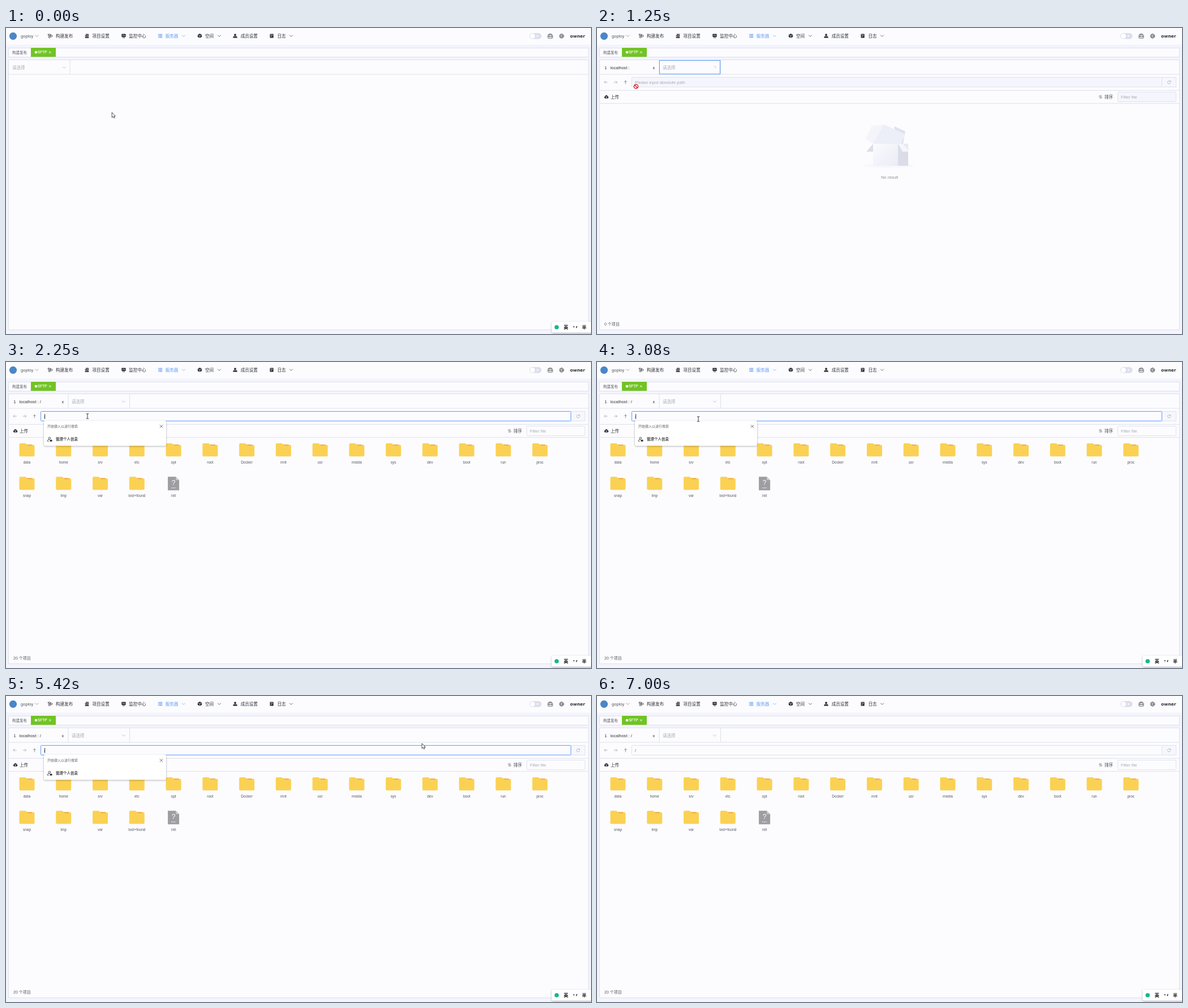
Animation of 1034 by 542 pixels, one loop 7.08 s. Source, as an HTML page:

```html
<!DOCTYPE html>
<html lang="zh-CN">
<head>
<meta charset="utf-8">
<title>SFTP</title>
<style>
html, body { margin: 0; width: 100%; height: 100%; overflow: hidden; background: #f3f4fc; }
svg { display: block; width: 1034px; height: 542px; font-family: "Liberation Sans", "Noto Sans CJK SC", "Noto Sans CJK", sans-serif; }
text { white-space: pre; }
.line { fill: none; stroke-linecap: round; stroke-linejoin: round; }
</style>
</head>
<body>
<svg id="stage" viewBox="0 0 1034 542"></svg>
<script>
const INK = '#303136', GREY = '#a8abb4', EDGE = '#dfe1ec', BLUE = '#5c9cfa', PAPER = '#fcfcff';
const BODY = 7.56, SMALL = 6.48;

const text = (x, y, s, fill = INK, size = BODY, more = '') =>
  `<text x="${x}" y="${y}" font-size="${size}" fill="${fill}" ${more}>${s}</text>`;
const rect = (x, y, w, h, fill, more = '') =>
  `<rect x="${x}" y="${y}" width="${w}" height="${h}" fill="${fill}" ${more}/>`;
const frame = (x, y, w, h, color, fill = 'none', more = '') =>
  rect(x + .5, y + .5, w - 1, h - 1, fill, `stroke="${color}" ${more}`);
const shape = (d, fill, more = '') => `<path d="${d}" fill="${fill}" ${more}/>`;
const line = (d, color = INK, width = .8) =>
  `<path class="line" d="${d}" stroke="${color}" stroke-width="${width}"/>`;
const disc = (x, y, r, fill) => `<circle cx="${x}" cy="${y}" r="${r}" fill="${fill}"/>`;
const at = (x, y, s) => `<g transform="translate(${x} ${y})">${s}</g>`;
const group = (id, s, more = '') => `<g id="${id}" ${more}>${s}</g>`;
const chevron = (x, y, color) => line(`M${x - 2.5} ${y - 1.2}l2.5 2.5l2.5 -2.5`, color, .7);
const cross = (x, y, r, color) => line(`M${x - r} ${y - r}l${2 * r} ${2 * r}m0 ${-2 * r}l${-2 * r} ${2 * r}`, color, .8);

// Icons are centred on their own origin.
const icons = {
  build: `<g class="line" stroke="${INK}" stroke-width=".8"><circle cx="-1.5" cy="-1.7" r="1.6"/><circle cx="-1.5" cy="2" r="1.5"/><circle cx="2" cy="0" r="1.7"/><path d="M-3.5 -3.2v2M0 -2h1"/></g>`,
  project: shape('M-2 -3.6h5v5h-5zM-3.4 1.9h6.8v1.8h-6.8zM-3.3 -1.2h1v2.4h-1z', INK) + line('M-.8 -2h2.6M-.8 -.3h2.6', '#fff', .6),
  monitor: rect(-3.7, -3.5, 7.4, 5.4, INK, 'rx=".8"') + line('M-2.4 -.7h1.2l1 -1.2l1 2l.8 -.8h.8', '#fff', .6) + line('M-1.8 3.2h3.6', INK, .9),
  server: [-2.6, 0, 2.6].map(y => line(`M-3 ${y}h.4M-1.2 ${y}h4.4`, BLUE, 1.4)).join(''),
  space: shape('M0 -4l3.7 1.8v4l-3.7 2l-3.7 -2v-4z', INK) + line('M-3.3 -1.9l3.3 1.7l3.3 -1.7M0 0v3.4', '#fff', .6),
  member: disc(0, -1.8, 1.9, INK) + shape('M-3.7 3.6v-1q0 -2 2 -2h3.4q2 0 2 2v1z', INK),
  log: rect(-3, -3.5, 6.2, 7, INK, 'rx=".6"') + line('M-1 1.6l2.4 -3.4M-1.4 -2h1', '#fff', .8),
  cloud: shape('M-2 2.6a2 2 0 0 1 -.4 -3.9a2.5 2.5 0 0 1 4.8 0a2 2 0 0 1 -.4 3.9z', INK) + line('M0 2v-2.6m-1 1l1 -1l1 1', '#fff', .6),
  refresh: line('M2.4 -1.4a2.7 2.7 0 1 0 .3 2M2.6 -2.8v1.6h-1.6', GREY),
  loading: line('M-1 -2.4a2.5 2.5 0 0 1 3 3', GREY, .7),
  sort: line('M-1 2.8v-5.4l-1.6 1.8M1 -2.8v5.4l1.6 -1.8', '#6c6e76'),
  toolbox: `<g class="line" stroke="${INK}" stroke-width=".7"><rect x="-4" y="-2.4" width="8" height="6" rx=".8"/><path d="M-2 -2.4v-1.5h4v1.5M-4 .5h8M-1.8 -.4v1.8M1.8 -.4v1.8"/></g>`,
  globe: `<g class="line" stroke="${INK}" stroke-width=".6"><circle r="3.7"/><ellipse rx="1.6" ry="3.7"/><path d="M-3.6 -1.2h7.2M-3.6 1.2h7.2"/></g>`,
  profile: line('M-2 3.4h-2v-1q0 -2 2.8 -2.2', INK) + `<circle class="line" cx="-.6" cy="-2" r="1.8" stroke="${INK}" stroke-width=".8"/>` + rect(.2, .8, 4, 3, INK, 'rx=".5"')
};

const menu = [
  ['build', 78, 88, '构建发布'], ['project', 143, 152.5, '项目设置'], ['monitor', 208, 217.3, '监控中心'],
  ['server', 272.5, 281.7, '服务器', 314], ['space', 342.5, 352, '空间', 377],
  ['member', 405, 414.7, '成员设置'], ['log', 469.5, 479.5, '日志', 504]
];

const navbar = rect(0, 0, 1034, 29.5, PAPER) + disc(12.5, 14.3, 6.6, '#4a86c8') +
  text(26, 16.8, 'goploy', '#55575e') + chevron(54.5, 14, '#77797f') +
  menu.map(([icon, x, tx, label, arrow]) => {
    const color = icon === 'server' ? BLUE : INK;
    return at(x, 14, icons[icon]) + text(tx, 16.9, label, color) + (arrow ? chevron(arrow, 14, color) : '');
  }).join('') +
  rect(925, 9, 21.5, 10.6, '#dcdeea', 'rx="5.3"') + disc(930.5, 14.3, 4.4, '#fff') + disc(939.5, 14.3, 1.8, '#f3f4fa') +
  at(962, 14.5, icons.toolbox) + at(982, 14.3, icons.globe) +
  text(997, 17.3, 'owner', INK, BODY, 'font-weight="bold" style="font-family:\'DejaVu Sans\',sans-serif"');

const tabs = frame(4, 35, 1026, 17, EDGE, PAPER) + text(11, 45.5, '构建发布', '#55575e', SMALL) +
  rect(44, 35, 44, 16, '#70c424') + disc(53, 43, 2.3, '#fff') +
  text(56, 45.4, 'SFTP', '#fff', SMALL, 'stroke="#fff" stroke-width=".15"') + cross(77.8, 43, 1.6, '#fff');

const panel = frame(4, 56, 1026, 479, EDGE, PAPER) + line('M5 82H1029', EDGE, 1);

const picker = line('M113 57V82', EDGE, 1) + text(11, 72.5, '请选择', GREY) + chevron(103, 70, GREY) +
  group('pickerFocus', frame(5, 57, 108, 25, BLUE));

const dropdown = group('dropdown',
  rect(5.5, 88.5, 107, 26, '#fff', `rx="2" stroke="${EDGE}" stroke-width=".6" filter="url(#soft)"`) +
  shape('M55.5 88.6l3.5 -3.4l3.5 3.4z', '#fff', `stroke="${EDGE}" stroke-width=".5"`) +
  group('optionHover', rect(6, 92, 106, 18.4, '#f3f5fb')) + text(16, 104, 'localhost', '#606268'));

const emptyBox = group('empty',
  `<ellipse cx="515" cy="244" rx="46" ry="3.5" fill="#f6f7fc"/>` +
  shape('M475 196L486 173L507 171L488 205z', '#f4f5fb') + shape('M525 174L545 183L541 205H532z', '#dfe1eb') +
  shape('M507 171L545 188L538 205H488z', '#eceef8') +
  shape('M476 219L488 205V219z', '#dcdfe9') + shape('M532 205H550V244H532z', '#e7e9f2') +
  shape('M532 205V244H550V219H539z', '#dadde7') + shape('M532 205H541L552 219H541z', '#f5f6fb') +
  rect(488, 205, 44, 39, 'url(#face)') + text(517, 267.3, 'No result', '#8e9098', BODY, 'text-anchor="middle"'));

const names = 'data home srv etc opt root Docker mnt usr media sys dev boot run proc snap tmp var lost+found init'.split(' ');
const folder = shape('M-13.5 2q0 -2 2 -2h9l2.8 2.8h11.2q2 0 2 2v16.4q0 2 -2 2h-23q-2 0 -2 -2z', '#fbd153') +
  shape('M-.5 2.2h9.8v1.9h-7.8z', '#eeaa38');
const unknown = shape('M-10 0h14l6 6v18h-20z', '#9d9da2') + shape('M4 0l6 6h-6z', '#c9c9ce') +
  text(0, 15, '?', '#fff', 12, 'text-anchor="middle"') + text(0, 21, 'none', '#fff', 4, 'text-anchor="middle"');
const files = group('files', names.map((name, i) =>
  at(37 + i % 15 * 64.77, 144 + Math.floor(i / 15) * 59.3,
    (name === 'init' ? unknown : folder) + text(0, 35.6, name, '#55575e', SMALL, 'text-anchor="middle"'))).join(''));

const browser = group('browser',
  text(13.3, 72.6, '1') + '<text id="server" x="23.7" y="72.6" font-size="7.56" fill="#303136"></text>' + text(98.6, 72.6, 'x') +
  line('M110 57V82M218.5 57V82', EDGE, 1) + text(116, 72.5, '请选择', GREY) +
  group('chevron', chevron(208, 70, GREY)) + group('waiting', at(208, 70, icons.loading)) +
  group('selectFocus', frame(110, 57, 108, 25, BLUE)) +
  line('M13 96h5.5m-5.5 0l2.3 -2.3m-2.3 2.3l2.3 2.3M35.5 96h-5.5m5.5 0l-2.3 -2.3m2.3 2.3l-2.3 2.3', GREY, .8) +
  line('M50.4 99v-5.6m0 0l-2.2 2.2m2.2 -2.2l2.2 2.2', '#75777e', .8) +
  frame(998, 87, 26, 18, EDGE, '#f6f7fd') + at(1011.2, 96.2, icons.refresh) +
  `<rect id="path" x="61.5" y="87.5" width="937" height="17" rx="1"/>` +
  group('hint', text(67, 98.7, 'Please input absolute path', GREY)) + group('slash', text(67, 98.7, '/', '#606268')) +
  group('caret', rect(68.2, 92, .9, 9, '#222')) +
  line('M5 110.5H1029M5 133.5H1029', EDGE, 1) +
  at(16.6, 122.2, icons.cloud) + text(24, 124.8, '上传') +
  at(890, 122, icons.sort) + text(897, 124.8, '排序', '#45474d', BODY, 'font-weight="500"') +
  `<rect id="filter" x="920.5" y="113.5" width="103" height="17" rx="1" stroke="${EDGE}"/>` + text(926, 124.7, 'Filter file', GREY) +
  emptyBox + files +
  group('mask', rect(5, 134, 1024, 382, PAPER, 'opacity=".9"') + '<circle id="spinner" class="line" cx="516.7" cy="325.5" r="9.3" stroke="#409eff" stroke-width="1.1" pathLength="360"/>') +
  '<text id="count" x="13" y="527.2" font-size="7.02" fill="#55575e"></text>');

const popup = group('popup', rect(67, 104, 216, 44.3, '#fff', 'rx="2" filter="url(#shadow)"') +
  text(73, 116.2, '开始键入以进行搜索', '#606268', 6) + cross(274.5, 114, 2.3, '#45474d') +
  at(77.3, 137, icons.profile) + text(88, 139.3, '管理个人信息', '#222', 6.5, 'stroke="#222" stroke-width=".1"'));

const inputBar = group('inputBar', rect(964.5, 520, 75, 19.5, '#fff', 'rx="2" filter="url(#shadow)"') +
  disc(973.3, 530, 3.8, '#17b78d') + text(985.8, 532.9, '英', '#111', 8, 'font-weight="bold"') +
  disc(1003.7, 529.2, 1, '#111') + line('M1009 528.4l-.8 2.4', '#111', 1.3) + text(1018, 533, '半', '#111', 8, 'font-weight="bold"'));

const pointers =
  group('arrow', shape('M0 0V9L2 7.2L3.5 10L5 9.3L3.7 6.6H6.2z', '#fff', 'stroke="#222" stroke-width=".8"')) +
  group('beam', line('M-1.8 -4.3h1.3l.5 .5l.5 -.5h1.3M0 -3.8v7.6M-1.8 4.3h1.3l.5 -.5l.5 .5h1.3', '#222', .9)) +
  group('hand', shape('M-1 1q0 -1.2 1 -1t1 1v3.4l3.4 .8q1.2 .4 1 1.8l-.8 3.6h-5l-3 -4.2q.4 -1.2 2.4 .2z', '#fff', 'stroke="#222" stroke-width=".8"')) +
  group('denied', '<circle r="3.6" fill="#fff" stroke="#d4142a" stroke-width="1.4"/>' + line('M-2.4 -2.4l4.8 4.8', '#d4142a', 1.4));

document.getElementById('stage').innerHTML = `<defs>
  <linearGradient id="face" x2="1" y2="1"><stop stop-color="#fafbfe"/><stop offset="1" stop-color="#eaecf6"/></linearGradient>
  <filter id="soft" x="-10%" y="-40%" width="120%" height="180%"><feDropShadow dx="0" dy="0" stdDeviation="2" flood-opacity=".12"/></filter>
  <filter id="shadow" x="-10%" y="-40%" width="120%" height="190%"><feDropShadow dx="0" dy="1" stdDeviation="1.8" flood-opacity=".35"/></filter>
</defs>` + rect(0, 0, 1034, 542, '#f3f4fc') + navbar + tabs + panel + group('start', picker) + browser + dropdown + popup + inputBar + group('cursor', pointers);

// Pointer route: time, x, y and, where it changes, the pointer kind.
const route = [
  [0, 189, 151, 'arrow'], [255, 100, 76, 'hand'], [420, 72, 66], [755, 72, 66], [1005, 69, 104],
  [1170, 69, 103.5, 'denied'], [1500, 69, 103.5, 'beam'], [1590, 69, 103], [2005, 144, 96], [2672, 144, 96],
  [2922, 168, 93], [3005, 168, 93], [3170, 190, 109, 'arrow'], [3420, 224, 108], [3755, 224, 105],
  [3830, 330, 98, 'beam'], [4005, 705, 94.5], [4250, 860, 80, 'arrow'], [4500, 978, -6], [4580, 978, -20],
  [4990, 941, -14], [5000, 941, 4], [5422, 735, 84], [5670, 722, 72], [5920, 722, 70], [6422, 954, 4],
  [6505, 970, 1], [6588, 975, -6], [6670, 978, -20], [7080, 978, -20]
];
const LOOP = 7080, TICK = 1000 / 12;
const el = id => document.getElementById(id);
const within = (t, ...spans) => spans.some(([from, to]) => t >= from && t < to);
const clamp = v => Math.max(0, Math.min(1, v));
const show = (id, on) => el(id).style.display = on ? '' : 'none';
const set = (id, attrs) => { for (const k in attrs) el(id).setAttribute(k, attrs[k]); };

function movePointer(t) {
  const i = route.findIndex(key => key[0] > t) - 1;
  const [t0, x0, y0] = route[i], [t1, x1, y1] = route[i + 1];
  const k = (t - t0) / (t1 - t0);
  const kind = route.slice(0, i + 1).map(key => key[3]).filter(Boolean).pop();
  set('cursor', { transform: `translate(${x0 + (x1 - x0) * k} ${y0 + (y1 - y0) * k})` });
  for (const name of ['arrow', 'beam', 'hand', 'denied']) show(name, name === kind);
}

function draw(now) {
  const t = Math.floor((now % LOOP + 3.4) / TICK) * TICK + 5;
  const opened = t >= 1170, ready = t >= 1500, listed = t >= 2000, focused = within(t, [2160, 5830]);
  show('start', !opened);
  show('browser', opened);
  show('pickerFocus', within(t, [420, 1170]));
  show('dropdown', within(t, [420, 1170]));
  const unfold = clamp((t - 400) / 300);
  set('dropdown', { opacity: unfold, transform: `translate(0 ${88 * (1 - unfold)}) scale(1 ${unfold})` });
  show('optionHover', t >= 900);
  show('selectFocus', within(t, [1170, 2160]));
  show('waiting', !ready);
  show('chevron', ready);
  show('hint', !ready);
  show('slash', ready);
  el('server').textContent = ready ? 'localhost : /' : 'localhost :';
  set('path', {
    fill: ready ? PAPER : '#f5f6fd',
    stroke: focused ? BLUE : within(t, [1500, 2160]) ? '#c4c6cc' : EDGE
  });
  set('filter', { fill: ready ? PAPER : '#f5f6fd' });
  show('caret', within(t, [2160, 2580], [3080, 3750], [4250, 4750], [5250, 5750]));
  show('empty', !listed);
  show('files', listed);
  el('count').textContent = `${listed ? 20 : 0} 个项目`;
  show('mask', within(t, [1500, 2250]));
  set('mask', { opacity: clamp((t - 1450) / 250) * (1 - clamp((t - 2090) / 160)) });
  const spin = clamp((t - 1500) / 750), eased = spin * spin * (3 - 2 * spin);
  set('spinner', {
    'stroke-dasharray': `${3 + 255 * eased} 360`,
    transform: `rotate(${115 * eased + 135 * spin} 516.7 325.5)`
  });
  show('popup', within(t, [2240, 5830]));
  show('inputBar', !within(t, [420, 2160], [5830, 7000]));
  movePointer(t);
}

function loop() {
  draw(performance.now());
  requestAnimationFrame(loop);
}
loop();
</script>
</body>
</html>
```
